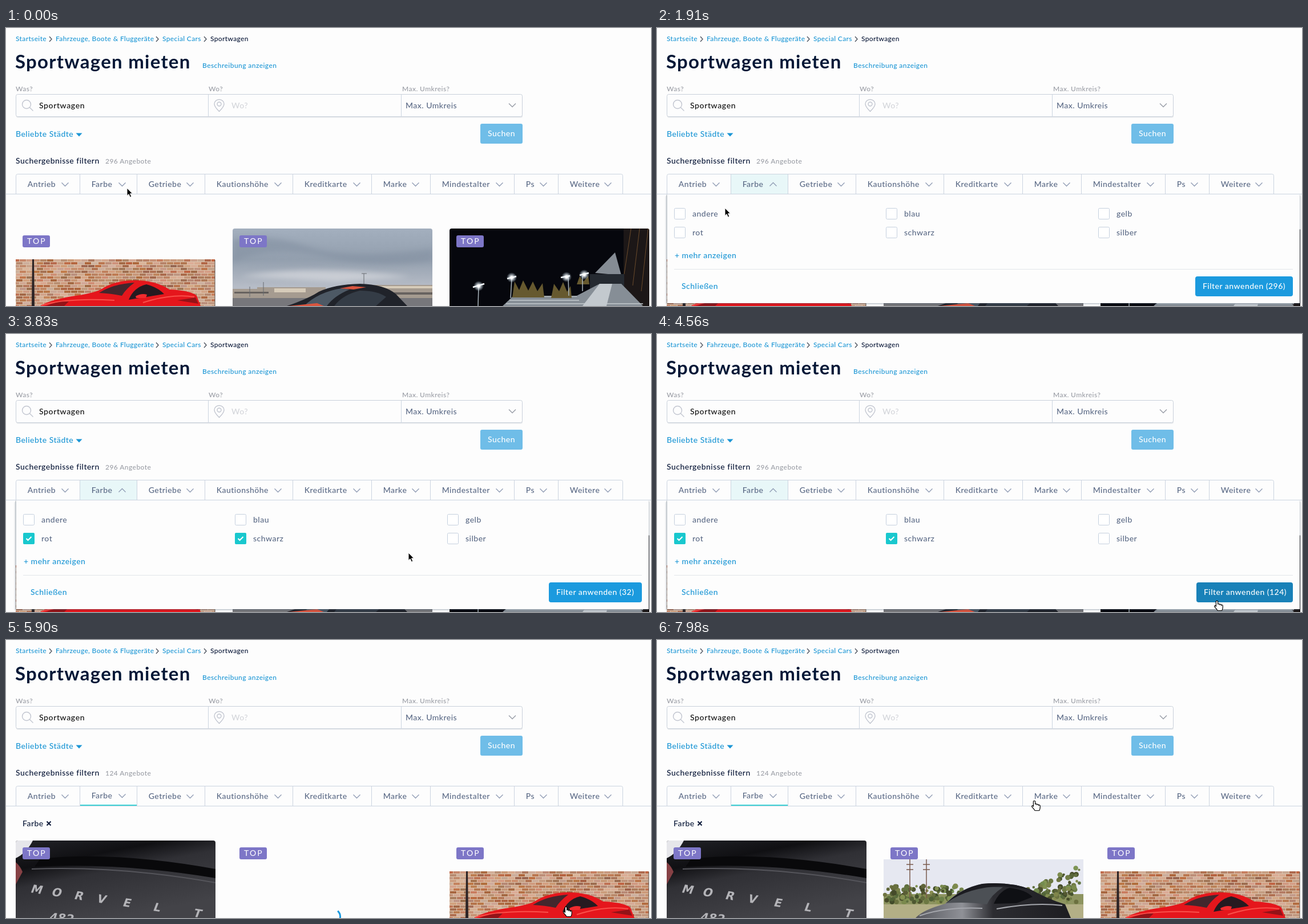
Animation, 1130 px wide and 488 px high, one loop 8000 ms. Source, as an HTML page:

```html
<!DOCTYPE html>
<html lang="de">
<head>
<meta charset="utf-8">
<title>Sportwagen mieten</title>
<style>
html, body { margin: 0; width: 100%; height: 100%; overflow: hidden; background: #fdfdfd; }
svg { display: block; width: 1130px; height: 488px; }
text { font: 500 14px Lato, "Open Sans", sans-serif; letter-spacing: .48px; fill: #5b6a86; white-space: pre; }
.small { font-size: 12px; letter-spacing: .44px; }
.crumb { font-size: 12px; letter-spacing: .35px; }
.link { fill: #1b96d5; }
.dark { fill: #0a1838; }
.grey { fill: #9a9da5; }
.white { fill: #fff; }
.title { font-size: 33px; font-weight: 700; letter-spacing: 1.25px; fill: #041837; }
.top { font-weight: 400; letter-spacing: 2.1px; fill: #fff; }
.line { fill: none; stroke: #cbd4e0; }
.chev { fill: none; stroke: #8f9bb3; stroke-width: 1.3; }
.badge { font: 700 20px "DejaVu Sans", sans-serif; fill: #b4b4b8; }
.soft { filter: blur(5px); }
</style>
</head>
<body>
<svg viewBox="0 0 1130 488">
  <defs>
    <linearGradient id="clouds" x2="0" y2="1">
      <stop stop-color="#a3afbe"/><stop offset=".4" stop-color="#939fae"/>
      <stop offset=".75" stop-color="#b6bcc6"/>
    </linearGradient>
    <linearGradient id="paint" x2=".5" y2="1">
      <stop stop-color="#222328"/><stop offset=".3" stop-color="#101013"/>
      <stop offset=".5" stop-color="#303035"/><stop offset="1" stop-color="#434348"/>
    </linearGradient>
    <linearGradient id="hood">
      <stop stop-color="#55565c"/><stop offset=".3" stop-color="#8f9197"/>
      <stop offset=".5" stop-color="#2c2c31"/><stop offset="1" stop-color="#1d1d21"/>
    </linearGradient>
    <radialGradient id="glow">
      <stop offset=".2" stop-color="#fff"/><stop offset="1" stop-color="#bcd6e8" stop-opacity="0"/>
    </radialGradient>
    <clipPath id="photo"><rect x="17" y="352" width="350" height="150" rx="4"/></clipPath>
    <clipPath id="wall"><path d="M17 406h349v82H17z"/></clipPath>
    <g id="red">
      <g clip-path="url(#wall)">
        <path d="M17 406h349v82H17z" fill="#dcc3ac"/>
        <g id="bricks"></g>
      </g>
      <path d="M46 406h3l1 82h-5z" fill="#2c2426"/>
      <path d="M366 407v81" stroke="#55453d"/>
      <path d="M60 488Q75 478 115 471 152 466 166 459 190 443 225 443 262 443 286 459 325 461 334 470L341 488Z" fill="#e5161c"/>
      <path d="M163 465Q188 449 225 447 210 458 203 470 184 466 163 465Z" fill="#43272d"/>
      <path d="M215 477Q224 455 246 450 266 455 277 467L240 473Z" fill="#261a20"/>
      <path d="M62 487Q110 473 190 478M240 482Q290 466 330 472" fill="none" stroke="#f9504a" stroke-width="2"/>
      <path d="M70 488q20-9 40-8l-8 8zM300 478l32-5 5 11z" fill="#931318"/>
      <path d="M227 471q10-6 20-3l-2 6h-17z" fill="#f32b2e"/>
    </g>
  </defs>

  <rect id="loadBg" y="61" width="1130" height="427" fill="#fbfdfc"/>

  <text class="crumb link" x="17" y="23">Startseite</text>
  <text class="crumb link" x="87" y="23">Fahrzeuge, Boote &amp; Fluggeräte</text>
  <text class="crumb link" x="274" y="23">Special Cars</text>
  <text class="crumb dark" x="358" y="23">Sportwagen</text>
  <path d="M76 15l4 4.500-4 4.500M263 15l4 4.500-4 4.500M347 15l4 4.500-4 4.500" fill="none" stroke="#555b66" stroke-width="1.500"/>
  <text class="title" x="16" y="71">Sportwagen mieten</text>

  <text class="small grey" x="17" y="111">Was?</text>
  <text class="small grey" x="355" y="111">Wo?</text>
  <text class="small grey" x="694" y="111">Max. Umkreis?</text>
  <rect x="18" y="119" width="887" height="38.500" rx="3" fill="#e6e8eb"/>
  <rect x="17.500" y="116.500" width="887" height="39" rx="3" fill="#fdfdfd" stroke="#c9d0da"/>
  <path class="line" d="M354.500 117v39M692.500 117v39"/>
  <path d="M43.500 134a7.500 7.500 0 1 1-15 0a7.500 7.500 0 1 1 15 0M41.500 139.500l6 6M373.500 146.500Q365 138 365 133.500a8.500 8 0 0 1 17 0Q382 138 373.500 146.500ZM377 133.500a3.500 3.500 0 1 1-7 0a3.500 3.500 0 1 1 7 0" fill="none" stroke="#c2c6d0" stroke-width="1.400"/>
  <text x="58" y="141" style="fill:#111;letter-spacing:.62px">Sportwagen</text>
  <text x="395" y="141" style="fill:#d3d5da">Wo?</text>
  <text x="700" y="141">Max. Umkreis</text>
  <path d="M881 132.500l6 6 6-6" fill="none" stroke="#9a9fa8" stroke-width="1.500"/>
  <rect x="831" y="168" width="74" height="35" rx="3" fill="#6fbde8"/>
  <text class="white" x="844" y="190">Suchen</text>

  <g id="page">
    <text class="small link" x="344" y="70">Beschreibung anzeigen</text>
    <text class="link" x="17" y="191">Beliebte Städte</text>
    <path d="M122.500 184.500h11l-5.500 6z" fill="#1b96d5"/>
    <text class="dark" x="17" y="238">Suchergebnisse filtern</text>
    <text class="small grey" x="174" y="238" id="offers"></text>

    <g id="before">
      <use href="#red"/>
      <g transform="translate(380)" clip-path="url(#photo)">
        <path d="M17 352h350v136H17z" fill="url(#clouds)"/>
        <path class="soft" d="M17 372Q80 360 150 384T367 388V408Q270 424 180 402T17 410Z" fill="#8491a2" opacity=".6"/>
        <path class="soft" d="M30 436Q150 415 330 437L200 446Z" fill="#c9cdd4"/>
        <path d="M17 458H60V455H180V461H260V451H367V488H17Z" fill="#a59b90"/>
        <path d="M17 474H367V488H17Z" fill="#77777b"/>
        <path d="M262 453h105v4H262zM90 457h55v7H90z" fill="#d6cbb9"/>
        <path d="M20 463h60v3H20zM275 464h92v4H275z" fill="#67625f"/>
        <path d="M247 431v24M243 431h9M71 446v24M47 454v18" stroke="#666a70" fill="none"/>
        <path d="M112 488Q150 475 168 463 195 450 240 449 283 450 303 467L323 488Z" fill="#20232a"/>
        <path d="M142 488Q168 463 208 457L222 459Q195 470 182 488Z" fill="#4d5965"/>
        <path d="M195 488Q210 468 240 461 270 461 286 472L268 488Z" fill="#343c46"/>
        <path d="M115 488l50-5 12 5zM205 457l22-4 24 2-22 4z" fill="#d9553f"/>
      </g>
      <g transform="translate(760)" clip-path="url(#photo)">
        <path d="M17 352h350v136H17z" fill="#06070d"/>
        <path d="M322 352h45v136h-45z" fill="#1c1717"/>
        <path d="M335 352l-12 80M350 352l-12 100M365 352l-12 110" stroke="#6a4a2b"/>
        <path d="M272 430L307 394 318 434Z" fill="#858c94"/>
        <path d="M263 432h60v28h-60z" fill="#252a31"/>
        <path d="M110 488l18-17h110l42-22h38l38 39z" fill="#868e96"/>
        <path d="M250 488l30-39h22l-10 39z" fill="#c3c9ce"/>
        <path d="M128 471h112M122 478h122M116 484h240" stroke="#c4cace" stroke-width="1.500"/>
        <path d="M127 473l4-28 8 15 7-17 9 18 8-16 8 17 9-14 3 25zM195 474l5-25 9 13 7-16 7 17 6-10 2 21zM240 450l5-14 7 9 8-10 2 15z" fill="#66592f"/>
        <path d="M67 488l1-33M124 474l2-35M226 470l-1-34M250 462V435" stroke="#aab5bc" stroke-width="1.500"/>
        <path d="M58 455l20-6M118 440l16-4M212 438l16-3M245 434l16-4" stroke="#fff" stroke-width="2.500"/>
        <g id="lamps" fill="url(#glow)"></g>
      </g>
    </g>

    <g id="after">
      <g clip-path="url(#photo)">
        <path d="M17 352h350v136H17z" fill="url(#paint)"/>
        <path d="M17 352h30Q36 374 17 383Z" fill="#e6e6ea"/>
        <path d="M17 390q8 7 12 17l-12 22z" fill="#864145"/>
        <path d="M60 384Q190 370 367 402V418Q200 390 50 398Z" fill="#09090b"/>
        <path d="M45 402Q200 396 367 426" fill="none" stroke="#55555b" stroke-width="2"/>
        <g transform="translate(42 443) rotate(8.500) skewX(-12)">
          <text class="badge" x="0 37 77 117 163 217 288">MORVELT</text>
        </g>
        <text class="badge" x="76" y="493" transform="rotate(5 76 493)" style="font-style:italic">482</text>
      </g>
      <use href="#red" x="760"/>
      <g id="lateCar" transform="translate(380)">
        <path d="M17 385h350v103H17z" fill="#e6e8f1"/>
        <path d="M17 446h350v42H17z" fill="#8d9460"/>
        <g id="leaves"></g>
        <path d="M17 464h350v24H17z" fill="#b3af86"/>
        <path d="M63 385v68M92 385v68M57 394h12M57 403h12M86 394h12M86 403h12" stroke="#7a5a4c" stroke-width="1.500"/>
        <path d="M73 488Q85 474 125 463 150 436 190 428 240 424 275 438 305 455 335 464L345 488Z" fill="url(#hood)"/>
        <path d="M126 462Q155 438 190 433L226 434Q205 448 198 464 160 459 126 462Z" fill="#4c5055"/>
        <path d="M210 463Q220 440 238 435 265 438 278 451L250 462Z" fill="#0f1014"/>
        <path d="M128 461Q152 436 190 428 240 424 275 438L225 432Q165 434 128 461Z" fill="#1b1b20"/>
        <path d="M80 484Q125 468 190 471M215 472Q280 460 330 466" stroke="#a5a7ad" fill="none" stroke-width="2"/>
      </g>
      <text class="dark" x="29" y="327">Farbe</text>
      <path d="M71.500 318.500l7 7m0-7l-7 7" stroke="#0a1838" stroke-width="2"/>
    </g>

    <g id="tops"></g>
    <path class="line" d="M0 291.500H1130"/>
    <g id="panel">
      <rect x="14" y="294" width="1115" height="192" rx="4" fill="#34495e" opacity=".08"/>
      <rect x="16" y="292" width="1111" height="192.500" rx="2" fill="#34495e" opacity=".22"/>
      <rect x="18" y="292" width="1108" height="191" fill="#fdfdfd"/>
      <g id="boxes"></g>
      <text class="link" x="31" y="404">+ mehr anzeigen</text>
      <path d="M30 423.500H1114" stroke="#e2e6ea"/>
      <text class="link" x="43" y="458">Schließen</text>
      <rect id="apply" y="436" height="35" rx="4"/>
      <text class="white" id="applyText" y="458"></text>
    </g>
    <path class="line" d="M17.500 291V259.500q0-3 3-3H1077.500q3 0 3 3V291"/>
    <g id="tabs"></g>
  </g>

  <g id="loading">
    <path d="M0 223.500H1130" stroke="#d3d8df"/>
    <path d="M0 444H1130V488H0Z" fill="#031837"/>
  </g>
  <path id="spinner" d="M-10-9.500A14 14 0 0 1 12.500-5.500" fill="none" stroke="#1b9ae0" stroke-width="3"/>

  <g id="cursor">
    <path id="arrow" d="M0 0V13.500L3.100 10.700 5.400 16 7.800 15 5.500 9.800H9.600Z" fill="#000" stroke="#fff"/>
    <path id="hand" d="M-1.600 10.500V1.600Q-1.600.3 0 .3T1.600 1.600V6.500Q2 5.300 3.400 5.600T4.800 7Q5.400 6.200 6.600 6.600T7.600 8Q8.400 7.200 9.400 7.800T10.200 9.300V12.500Q10 15 8.600 17.500H1.200Q-1 14-4.200 10.800-4.800 9.500-3.600 8.900T-1.600 10.500Z" fill="#fff" stroke="#000" stroke-width="1.200"/>
  </g>
</svg>

<script>
const $ = id => document.getElementById(id);
const show = (id, on) => $(id).style.display = on ? "" : "none";
const fill = (id, items, markup) => $(id).innerHTML = items.map(markup).join("");
const range = n => [...Array(n).keys()];
let seed = 7;
const rand = () => (seed = seed * 16807 % 2147483647) / 2147483647;

const edges = [17, 129, 229, 348, 502, 640, 743, 890, 967, 1080];
const filters = ["Antrieb", "Farbe", "Getriebe", "Kautionshöhe", "Kreditkarte", "Marke", "Mindestalter", "Ps", "Weitere"];
const colours = ["andere", "blau", "gelb", "rot", "schwarz", "silber"];

fill("tabs", filters, (name, i) => `
  ${i ? `<path class="line" d="M${edges[i] + .5} 257V291"/>` : ""}
  ${i == 1 ? '<rect id="openTab" x="130" y="257" width="99" height="34" fill="#e8f7f8"/><path id="activeTab" d="M130 290H229" stroke="#3fd2d6" stroke-width="2"/>' : ""}
  <g id="tab${i}"><text x="${edges[i] + 20.7}" y="279">${name}</text>
  <path class="chev" d="M${edges[i + 1] - 31.5} 271.500l6 6 6-6"/></g>`);
$("tab1").lastElementChild.id = "chevron";

fill("tops", [29, 409, 789], x => `
  <rect x="${x}" y="364" width="48" height="21" rx="3" fill="#7d76c7"/>
  <text class="top" x="${x + 8}" y="379">TOP</text>`);

fill("boxes", colours, (name, i) => {
  const x = [30, 401, 773][i % 3], y = i < 3 ? 316 : 349;
  return `<rect x="${x + .5}" y="${y + .5}" width="19" height="19" rx="2" fill="#fff" stroke="#c5d0de"/>
  <g id="check${i}"><rect x="${x}" y="${y}" width="20" height="20" rx="2" fill="#19c8ce"/>
  <path d="M${x + 5.5} ${y + 10}l3 3 6-6" fill="none" stroke="#fff" stroke-width="2"/></g>
  <text x="${x + 32}" y="${y + 15}">${name}</text>`;
});

fill("lamps", [[68, 453], [126, 438], [222, 437], [253, 433]], ([x, y]) => `<circle cx="${x}" cy="${y}" r="9"/>`);

fill("bricks", range(17 * 30), i => {
  const row = Math.floor(i / 30), x = 12 + i % 30 * 12 + row % 2 * 6;
  return `<rect x="${x}" y="${406 + row * 5}" width="11" height="4" fill="hsl(${16 + rand() * 10} ${30 + rand() * 20}% ${45 + rand() * 28}%)"/>`;
});

// Two clumps of trees, with a gap of open sky behind the roof
fill("leaves", range(240), i => {
  const left = i % 2, x = left ? 19 + rand() * 135 : 245 + rand() * 118;
  const crown = left ? 432 : 446 - (x - 245) * .42;
  const y = crown + rand() * (460 - crown);
  return `<circle cx="${x}" cy="${y}" r="${2 + rand() * 3}" fill="hsl(${65 + rand() * 20} 28% ${22 + rand() * 24}%)"/>`;
});

// Pointer path: step, x, y
const path = [[-2, 212, 281], [-1, 212, 281], [0, 198, 274], [9, 198, 274], [13, 40, 357], [14, 40, 357],
  [17, 248, 351], [18, 342, 349], [20, 410, 356], [22, 411, 357], [25, 852, 398], [29, 981, 468],
  [38, 981, 468], [41, 371, 323], [42, 334, 323], [44, 334, 323], [52, 661, 282]];

function pointer(n) {
  const i = Math.max(1, path.findIndex(p => p[0] >= n));
  const [a, ax, ay] = path[i - 1], [b, bx, by] = path[i];
  const k = (n - a) / (b - a);
  return [ax + (bx - ax) * k, ay + (by - ay) * k];
}

function draw(t) {
  // The screen refreshes in even steps
  const n = Math.min(52, Math.floor((t - 258) / 148.27));
  const [x, y] = pointer(n);
  const open = n >= 2 && n < 34, loading = n >= 34 && n < 38, done = n >= 38;
  const count = n < 18 ? 296 : n < 25 ? 32 : 124;

  show("loadBg", loading);
  show("loading", loading);
  show("page", !loading);
  show("before", !done);
  show("after", done);
  show("lateCar", n >= 40);
  show("panel", open);
  show("openTab", open);
  show("activeTab", done);
  $("tab1").setAttribute("transform", `translate(0 ${done ? -1 : 0})`);
  $("chevron").setAttribute("transform", open ? "matrix(1 0 0 -1 0 549)" : "");
  $("offers").textContent = (done ? 124 : 296) + " Angebote";

  colours.forEach((c, i) => show("check" + i, i == 3 && n >= 14 || i == 4 && n >= 22));
  const left = { 296: 943, 32: 951, 124: 945 }[count];
  const hover = open && x > left && y > 436;
  $("apply").setAttribute("x", left);
  $("apply").setAttribute("width", 1114 - left);
  $("apply").setAttribute("fill", hover ? "#1981b8" : "#1b9ade");
  $("applyText").setAttribute("x", left + 13);
  $("applyText").textContent = `Filter anwenden (${count})`;

  show("spinner", loading || done && n < 40);
  $("spinner").setAttribute("transform", `translate(572 ${loading ? 359 : 486}) rotate(${(n - 34) * 112})`);

  const onBox = open && y > 345 && y < 375 && (Math.abs(x - 40) < 14 || Math.abs(x - 411) < 14);
  const hand = n >= 0 && (y < 292 || onBox || hover || done && y > 352);
  show("hand", hand);
  show("arrow", !hand);
  $("cursor").setAttribute("transform", `translate(${Math.round(x)} ${Math.round(y)})`);
}

const start = performance.now();
function tick() {
  draw((performance.now() - start) % 8000);
  requestAnimationFrame(tick);
}
tick();
</script>
</body>
</html>
```
